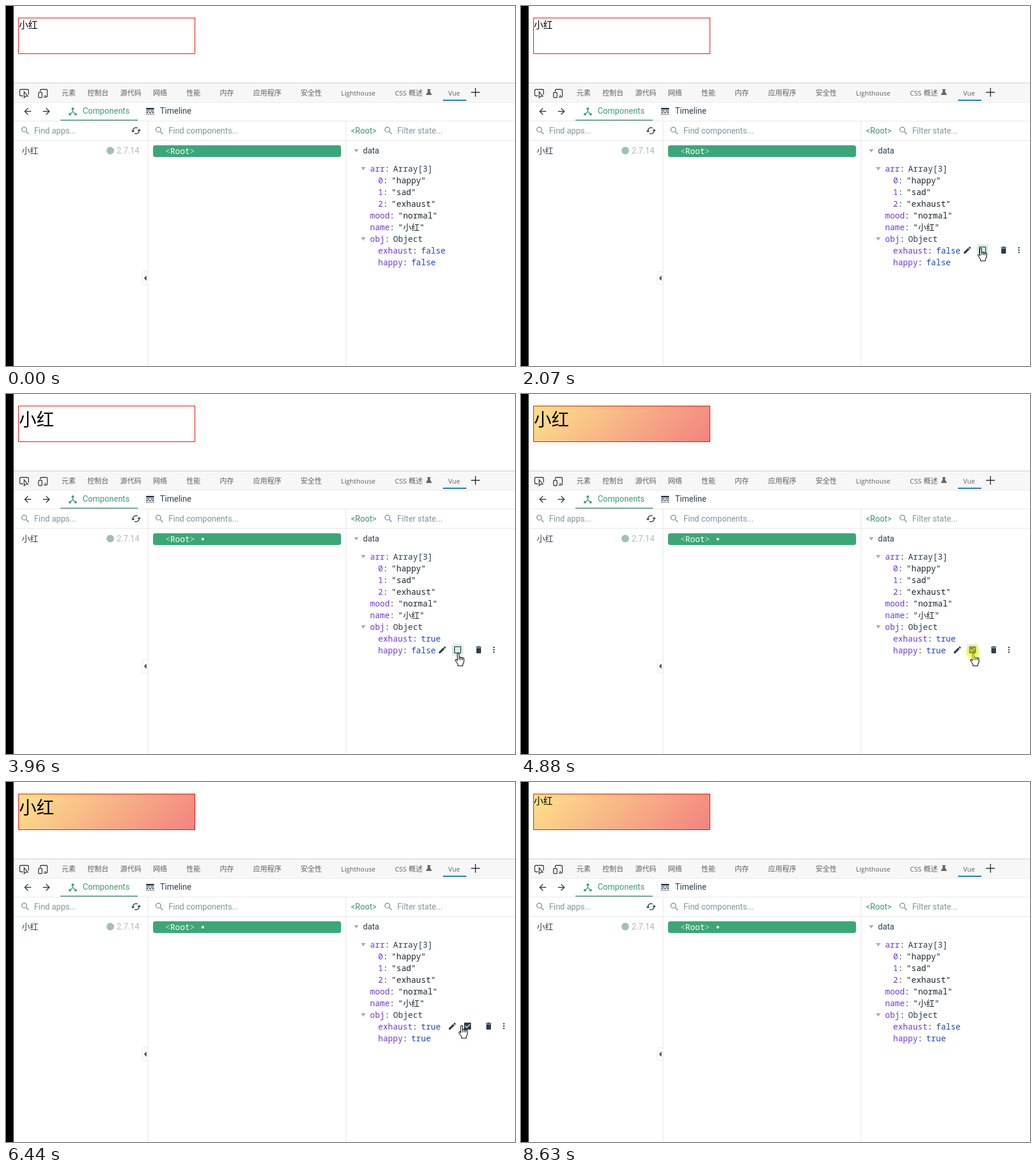
These frames come from a looping animation (869 px wide and 615 px high, 9.24 s). An HTML page:

```html
<!DOCTYPE html>
<html lang="zh-CN">
<head>
<meta charset="utf-8">
<style>
html, body { margin: 0; width: 100%; height: 100%; overflow: hidden; background: #fff; }
svg { display: block; }
text { white-space: pre; font: 14px Roboto, "Noto Sans CJK SC", "Noto Sans CJK", sans-serif; }
.tab { font: 12px "Noto Sans CJK SC", "Noto Sans CJK", sans-serif; fill: #606060; }
.latin { font: 11.4px "Open Sans", "Noto Sans CJK SC", sans-serif; fill: #606060; }
.mono { font: 14px "Roboto Mono", "Noto Sans Mono", "Noto Sans CJK SC", "Noto Sans CJK", monospace; }
.page { font-family: "Noto Sans CJK SC", "Noto Sans CJK", sans-serif; }
</style>
</head>
<body>
<svg id="stage" width="869" height="615" viewBox="0 0 869 615"></svg>
<script>
const LOOP = 9240;
const DARK = '#2c3e50', GREEN = '#3ba776', MUTED = '#7c979f', LINE = '#e6e6e6';
const KEY = '#7438db', BOOL = '#1f47bd', TEXT = '#202428';
const ICONS = {
  search: 'M15.5 14h-.79l-.28-.27A6.47 6.47 0 0 0 16 9.5 6.5 6.5 0 1 0 9.5 16c1.61 0 3.09-.59 4.23-1.57l.27.28v.79l5 4.99L20.49 19zm-6 0a4.5 4.5 0 1 1 0-9 4.5 4.5 0 0 1 0 9z',
  back: 'M20 11H7.83l5.59-5.59L12 4l-8 8 8 8 1.41-1.41L7.83 13H20z',
  forward: 'M4 11h12.17l-5.59-5.59L12 4l8 8-8 8-1.41-1.41L16.17 13H4z',
  reload: 'M19 8l-4 4h3a6 6 0 0 1-6 6 5.9 5.9 0 0 1-2.8-.7l-1.46 1.46A8 8 0 0 0 20 12h3zM6 12a6 6 0 0 1 6-6c1.01 0 1.97.25 2.8.7l1.46-1.46A8 8 0 0 0 4 12H1l4 4 4-4z',
  tree: 'M17 16l-4-4V8.82a3 3 0 1 0-2 0V12l-4 4H3v5h5v-3.05l4-4.2 4 4.2V21h5v-5z',
  timeline: 'M3 16h5v-2H3zm6.5 0h5v-2h-5zm6.5 0h5v-2h-5zM3 20h2v-2H3zm4 0h2v-2H7zm4 0h2v-2h-2zm4 0h2v-2h-2zm4 0h2v-2h-2zM3 12h8v-2H3zm10 0h8v-2h-8zM3 4v4h18V4z',
  edit: 'M3 17.25V21h3.75L17.81 9.94l-3.75-3.75zM20.71 7.04a1 1 0 0 0 0-1.41l-2.34-2.34a1 1 0 0 0-1.41 0l-1.83 1.83 3.75 3.75z',
  trash: 'M6 19a2 2 0 0 0 2 2h8a2 2 0 0 0 2-2V7H6zM19 4h-3.5l-1-1h-5l-1 1H5v2h14z',
  more: 'M10 6a2 2 0 1 0 4 0 2 2 0 1 0-4 0m0 6a2 2 0 1 0 4 0 2 2 0 1 0-4 0m0 6a2 2 0 1 0 4 0 2 2 0 1 0-4 0',
  empty: 'M19 5v14H5V5h14m0-2H5a2 2 0 0 0-2 2v14a2 2 0 0 0 2 2h14a2 2 0 0 0 2-2V5a2 2 0 0 0-2-2z',
  checked: 'M19 3H5a2 2 0 0 0-2 2v14a2 2 0 0 0 2 2h14a2 2 0 0 0 2-2V5a2 2 0 0 0-2-2zM10 17l-5-5 1.41-1.41L10 14.17l7.59-7.59L19 8z'
};

const rect = (x, y, w, h, fill, more = '') =>
  `<rect x="${x}" y="${y}" width="${w}" height="${h}" fill="${fill}" ${more}/>`;
const text = (x, y, s, fill = DARK, more = '') =>
  `<text x="${x}" y="${y}" fill="${fill}" ${more}>${s.replace(/</g, '&lt;')}</text>`;
const mono = (x, y, s, fill, more = '') => text(x, y, s, fill, 'class="mono" ' + more);
const path = (d, fill, more = '') => `<path d="${d}" fill="${fill}" ${more}/>`;
// Centred icon on a 24-unit grid
const icon = (name, x, y, size, fill = DARK, more = '') =>
  `<g transform="translate(${x - size / 2} ${y - size / 2}) scale(${size / 24})">${path(ICONS[name], fill, more)}</g>`;
const caret = (x, y) => path(`M${x - 4} ${y - 3}h8l-4 6z`, '#a9b1b5');

function field(x, y, key, value, fill = TEXT, id = '') {
  const end = x + key.length * 8.4;
  return mono(x, y, key, KEY) + mono(end, y, ':', DARK) +
    mono(end + 14.4, y, value, fill, id && `id="${id}"`);
}

function pageBox() {
  return rect(21.5, 20.5, 301, 61, '#fff', 'id="box" stroke="#f00000"') +
    text(22, 38, '小红', '#000', 'id="title" class="page"');
}

function toolTabs() {
  const tabs = [[95, '元素'], [139, '控制台'], [195, '源代码'], [251, '网络'], [308, '性能'],
    [365, '内存'], [422, '应用程序'], [503, '安全性'], [687.5, '概述']];
  const latin = [[572, 'Lighthouse'], [664, 'CSS'], [755, 'Vue']];
  const stroke = 'stroke="#333" stroke-width="1.3"';
  return rect(13, 131, 856, 34, '#f7f7f7') + rect(13, 131, 856, 1, '#cbcbcb') + rect(13, 164, 856, 1, '#e9e9e9') +
    tabs.map(([x, s]) => text(x, 153, s, '', 'class="tab"')).join('') +
    latin.map(([x, s]) => text(x, 153, s, '', 'class="latin"')).join('') +
    rect(746, 160, 40, 2, '#1873c9') +
    path('M29 153.5h-3.5a2 2 0 0 1-2-2v-7a2 2 0 0 1 2-2h11a2 2 0 0 1 2 2v7', 'none', stroke) +
    path('M31 146.5v10.3l2.6-2.6h3.7z', '#fff', stroke) +
    path('M58.5 146v-1.5a2 2 0 0 1 2-2h8a2 2 0 0 1 2 2v9a2 2 0 0 1-2 2h-4M66 153h2', 'none', stroke) +
    rect(55.5, 147.5, 6, 9, 'none', 'rx="1.5" ' + stroke) +
    path('M794 147.5h15M801.5 140v15', 'none', 'stroke="#222" stroke-width="1.4"') +
    path('M719 142h6v1.3h-1v3l3.2 5.7h-10.4l3.2-5.7v-3h-1z', '#666');
}

function panels() {
  const fade = 'fill-opacity=".7"';
  return icon('back', 37, 180, 18) + icon('forward', 69, 180, 18) +
    icon('tree', 114, 180, 18, GREEN) + text(131, 184, 'Components', '#3b9d74') +
    icon('timeline', 246, 180, 18) + text(263, 184, 'Timeline') +
    rect(13, 196, 856, 1, LINE) + rect(93, 194, 132, 2, '#70a893') +
    rect(13, 229, 856, 1, LINE) + rect(242, 197, 1, 418, LINE) + rect(580, 197, 1, 418, LINE) +
    [33, 262, 653].map(x => icon('search', x, 213, 18, MUTED)).join('') +
    text(48, 218, 'Find apps...', MUTED) + icon('reload', 222, 213, 18) +
    text(277.5, 218, 'Find components...', MUTED) +
    text(589, 218, '<Root>', '#3b9472') + text(668, 218, 'Filter state...', MUTED) +
    text(27, 252, '小红') + '<circle cx="178" cy="247" r="6.5" fill="#9fc1b4"/>' +
    text(189, 252, '2.7.14', '#b0b7bb') +
    rect(251, 238, 321, 20, GREEN, 'rx="4"') +
    mono(272, 253, '<', '#fff', fade) + mono(280.4, 253, 'Root', '#fff', 'font-weight="500"') +
    mono(314, 253, '>', '#fff', fade) + '<circle id="dot" cx="336" cy="248" r="2.3" fill="#fff"/>' +
    rect(232.5, 453.5, 10, 23, '#fff', `rx="3" stroke="${LINE}"`) + rect(242, 450, 1, 30, LINE) +
    path('M235.5 465l4.5-4.5v9z', '#555');
}

function state() {
  return caret(598, 247.5) + text(609.5, 252, 'data') +
    caret(610, 278) + field(621.5, 283, 'arr', 'Array[3]', DARK) +
    ['happy', 'sad', 'exhaust'].map((s, i) => field(635.3, 303 + i * 20, String(i), `"${s}"`)).join('') +
    field(621.5, 363, 'mood', '"normal"') + field(621.5, 383, 'name', '"小红"') +
    caret(610, 398) + field(621.5, 403, 'obj', 'Object', DARK) +
    field(635.3, 423, 'exhaust', 'false', BOOL, 'exhaust') +
    field(635.3, 443, 'happy', 'false', BOOL, 'happy');
}

// Row buttons, placed relative to the checkbox centre
const buttons = '<g id="buttons">' + rect(-10, -10, 20, 20, '#d6f1e5', 'id="hover" rx="4"') +
  icon('edit', -26, 0, 16) + icon('empty', 0, 0, 16, DARK, 'id="check"') +
  icon('trash', 36, 0, 16) + icon('more', 62, 0, 16) + '</g>';

const outline = 'stroke="#000" stroke-width="1.1" stroke-linejoin="round"';
const cursor = '<g id="cursor">' +
  path('M0 .5V16l3.6-3.4 2.4 5.6 2.3-1L6 11.7h5z', '#fff', 'id="arrow" ' + outline) +
  `<g id="hand" transform="translate(-5.5 .5)">` +
  path('M4 13V1.8a1.5 1.5 0 0 1 3 0V8a1.4 1.4 0 0 1 2.8.5 1.4 1.4 0 0 1 2.8.7 1.3 1.3 0 0 1 2.7 1v5.3l-2 4V22H5.2v-2.5L.8 13a1.4 1.4 0 0 1 2-1.8z', '#fff', outline) +
  path('M7 8v4M9.8 8.5V12M12.6 9.2v3', 'none', outline) + '</g></g>';

stage.innerHTML =
  '<defs><linearGradient id="warm" gradientUnits="userSpaceOnUse" x1="81" y1="-40" x2="263" y2="142">' +
  '<stop stop-color="#fce38a"/><stop offset="1" stop-color="#f38181"/></linearGradient></defs>' +
  rect(0, 0, 869, 615, '#fff') + pageBox() + toolTabs() + panels() + state() + buttons + cursor +
  '<circle id="click" r="12" fill="#ff0"/>' + rect(0, 0, 13, 615, '#000');

// Pointer tip: time, x, y
const TRACK = [[290, 835, 612], [600, 760, 545], [860, 722, 455], [1010, 721, 438], [1170, 718, 432],
  [1220, 718, 432], [1500, 742, 428], [1800, 772, 417], [2070, 785, 412.5], [2800, 785, 412.5],
  [3000, 784, 428], [3160, 785, 440], [3240, 785, 440], [3610, 771.5, 441.5], [6260, 771.5, 441.5],
  [6440, 778, 415], [6700, 787, 412.5], [7880, 787, 412.5], [8050, 792, 436], [8250, 806, 490], [8630, 841, 616]];
const CLICKS = [2250, 3750, 4840, 5670, 6900];
// Toggle times; the tool panel follows the page a little later
const TOGGLES = { exhaust: [2640, 7210], happy: [4140, 5140, 5990] };
const LAG = 120;

const $ = id => document.getElementById(id);
const show = (id, on) => $(id).setAttribute('visibility', on ? 'visible' : 'hidden');
const isOn = (key, t) => TOGGLES[key].filter(at => t >= at).length % 2 === 1;

function pointer(t) {
  const i = TRACK.findIndex(p => p[0] > t);
  if (i < 1) return null;
  const [t0, x0, y0] = TRACK[i - 1], [t1, x1, y1] = TRACK[i];
  const k = (t - t0) / (t1 - t0);
  return { x: x0 + (x1 - x0) * k, y: y0 + (y1 - y0) * k };
}

function draw(t) {
  const big = isOn('exhaust', t);
  $('title').style.fontSize = big ? '30px' : '16px';
  $('title').setAttribute('y', big ? 54 : 38);
  $('box').setAttribute('fill', isOn('happy', t) ? 'url(#warm)' : '#fff');
  for (const key in TOGGLES) $(key).textContent = isOn(key, t - LAG);
  show('dot', t >= TOGGLES.exhaust[0] + LAG);

  const p = pointer(t);
  const row = !p || p.y < 409 || p.y >= 448 ? '' : p.y < 428 ? 'exhaust' : 'happy';
  $('buttons').style.display = row ? '' : 'none';
  if (row) {
    const x = row === 'happy' ? 771 : 788, y = row === 'happy' ? 437 : 417;
    $('buttons').setAttribute('transform', `translate(${x} ${y})`);
    $('check').setAttribute('d', ICONS[isOn(row, t - LAG) ? 'checked' : 'empty']);
    $('hover').style.display = Math.abs(p.x - x) < 9.9 ? '' : 'none';
  }

  $('cursor').style.display = p ? '' : 'none';
  if (p) {
    $('cursor').setAttribute('transform', `translate(${Math.round(p.x)} ${Math.round(p.y)})`);
    $('hand').style.display = row ? '' : 'none';
    $('arrow').style.display = row ? 'none' : '';
    $('click').setAttribute('cx', p.x);
    $('click').setAttribute('cy', p.y);
  }
  const age = t - CLICKS.filter(at => t >= at).pop();
  $('click').setAttribute('opacity', age < 210 ? 0.6 * (1 - age / 210) : 0);
}

const start = performance.now();
function tick() {
  draw((performance.now() - start) % LOOP);
  requestAnimationFrame(tick);
}
tick();
</script>
</body>
</html>
```
